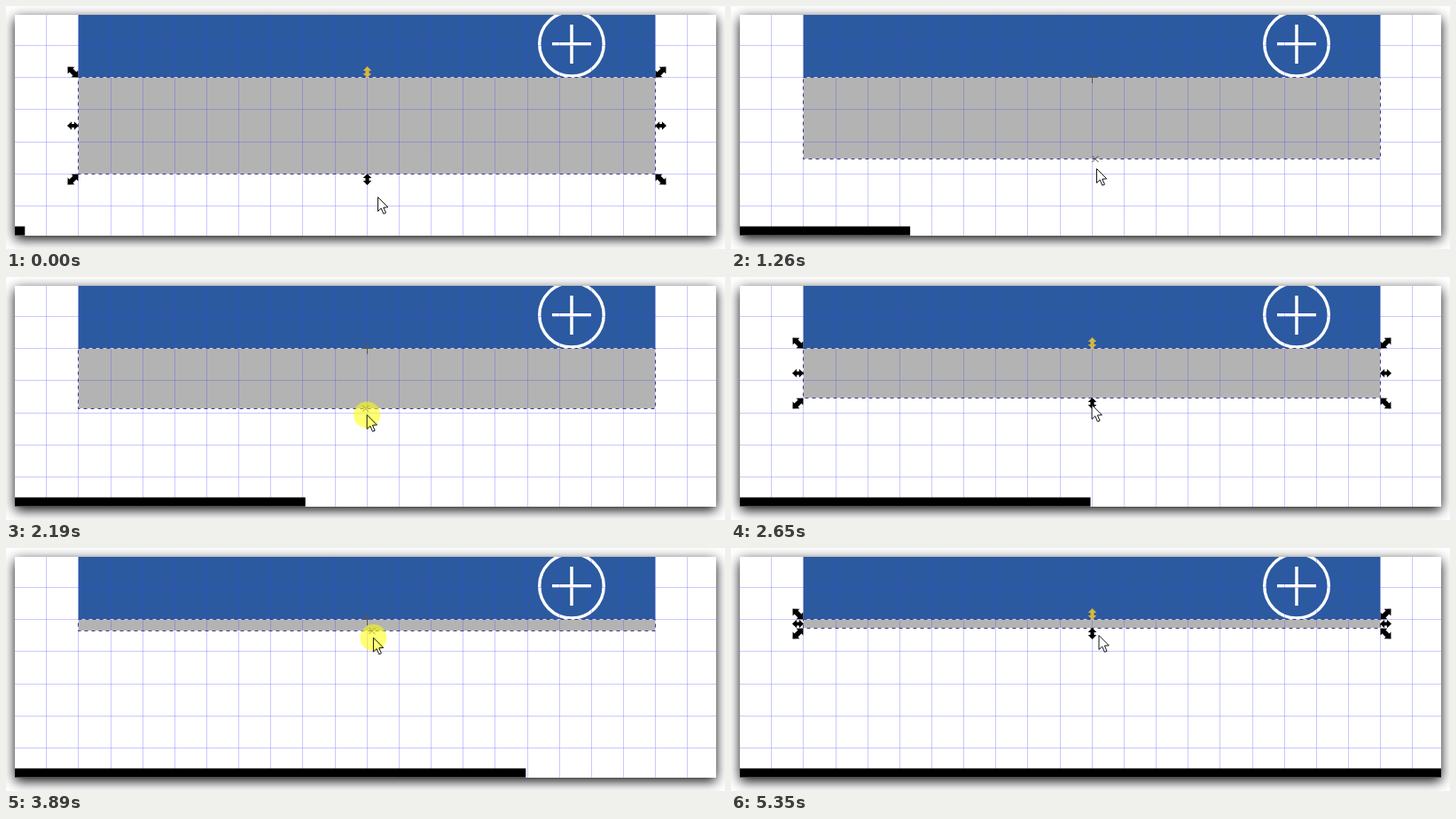
Animation, 811 px wide and 274 px high, one loop 5430 ms. Source, as an HTML page with a canvas:

```html
<!DOCTYPE html>
<html lang="en">
<head>
<meta charset="utf-8">
<title>Resizing a rectangle</title>
<style>
  html, body { margin: 0; width: 100%; height: 100%; overflow: hidden; background: #fff; }
  canvas { display: block; }
</style>
</head>
<body>
<canvas id="stage" width="811" height="274"></canvas>
<script>
const ctx = document.getElementById('stage').getContext('2d');
const LOOP = 5430, STEPS = 70;
const LEFT = 81, RIGHT = 732, TOP = 80, MIDDLE = 407;
const SETTLE = 30; // ms from release until the handles return

// Each stop is eased into; "held" marks a drag that ends there.
const stops = [
  { at: 0, x: 419.5, y: 215.5, bottom: 189 },
  { at: 700, x: 409, y: 200, bottom: 189 },
  { at: 1240, x: 412.5, y: 183.5, bottom: 172, held: true },
  { at: 1870, x: 406.5, y: 174.5, bottom: 172 },
  { at: 2600, x: 407.5, y: 145.5, bottom: 136, held: true },
  { at: 2940, x: 405.5, y: 139.5, bottom: 136 },
  { at: 4190, x: 415, y: 98.5, bottom: 90, held: true },
];

const easeOut = p => 1 - (1 - p) ** 2;

function poseAt(time) {
  const resizing = stops.some((stop, i) =>
    stop.held && time >= stops[i - 1].at && time < stop.at + SETTLE);
  const next = stops.findIndex(stop => stop.at > time);
  if (next < 0) return { ...stops[stops.length - 1], held: false, resizing };
  const a = stops[next - 1], b = stops[next];
  const p = easeOut((time - a.at) / (b.at - a.at));
  const mix = key => a[key] + (b[key] - a[key]) * p;
  return { x: mix('x'), y: mix('y'), bottom: Math.round(mix('bottom')), held: b.held, resizing };
}

function polygon(points) {
  ctx.beginPath();
  points.forEach(([x, y]) => ctx.lineTo(x, y));
  ctx.closePath();
}

function line(color, width, x1, y1, x2, y2) {
  ctx.strokeStyle = color;
  ctx.lineWidth = width;
  ctx.beginPath();
  ctx.moveTo(x1, y1);
  ctx.lineTo(x2, y2);
  ctx.stroke();
}

function disc(x, y, r) {
  ctx.beginPath();
  ctx.arc(x, y, r, 0, 2 * Math.PI);
}

function box(color, x, y, w, h) {
  ctx.fillStyle = color;
  ctx.fillRect(x, y, w, h);
}

function drawPanel() {
  ctx.save();
  ctx.shadowColor = 'rgba(0,0,0,.95)';
  ctx.shadowBlur = 13;
  ctx.shadowOffsetY = 4;
  box('#fff', 10, 10, 791, 249);
  ctx.restore();
}

function drawPlusButton() {
  ctx.strokeStyle = '#fff';
  ctx.lineWidth = 3.5;
  disc(638, 42.8, 36.3);
  ctx.stroke();
  line('#fff', 3.5, 616, 42.8, 660, 42.8);
  line('#fff', 3.5, 638, 21, 638, 65);
}

function drawGrid() {
  const color = 'rgba(63,63,255,.28)', pitch = 36.15;
  for (let k = 1; k < 22; k++) {
    const x = Math.round(9.15 + pitch * k) + .5;
    line(color, 1, x, 10, x, 259);
  }
  for (let k = 1; k < 7; k++) {
    const y = Math.round(8 + pitch * k) + .5;
    line(color, 1, 10, y, 801, y);
  }
}

function drawSelection(bottom) {
  const outline = [LEFT + .5, TOP + .5, RIGHT - LEFT, bottom - TOP];
  ctx.lineWidth = 1;
  ctx.strokeStyle = 'rgba(255,255,255,.55)';
  ctx.strokeRect(...outline);
  ctx.setLineDash([4, 4]);
  ctx.strokeStyle = '#3a3a8c';
  ctx.strokeRect(...outline);
  ctx.setLineDash([]);
}

function drawHandle(x, y, degrees, color = '#000') {
  const diagonal = degrees % 90 !== 0;
  const [tip, base, half, shaft] = diagonal ? [8.5, 2.8, 5.5, 2.8] : [6.5, 1.4, 4.8, 2.1];
  ctx.save();
  ctx.translate(x + .5, y + .5);
  ctx.rotate(degrees * Math.PI / 180);
  polygon([[-tip, 0], [-base, -half], [-base, -shaft], [base, -shaft], [base, -half],
    [tip, 0], [base, half], [base, shaft], [-base, shaft], [-base, half]]);
  ctx.fillStyle = color;
  ctx.fill();
  ctx.restore();
}

function drawHandles(bottom) {
  const l = LEFT - 6, r = RIGHT + 6, t = TOP - 6, b = bottom + 6, mid = (TOP + bottom) / 2;
  drawHandle(l, t, 45);
  drawHandle(r, t, -45);
  drawHandle(l, b, -45);
  drawHandle(r, b, 45);
  drawHandle(l, mid, 0);
  drawHandle(r, mid, 0);
  drawHandle(MIDDLE, b, 90);
  drawHandle(MIDDLE, t, 90, '#d8b640');
}

function drawDragMarks(x, bottom) {
  const y = bottom + .5, d = 3.5;
  line('#5c5650', 1, 401, TOP + .5, 414, TOP + .5);
  line('#5c5650', 1, MIDDLE + .5, TOP - 6, MIDDLE + .5, TOP + 7);
  line('#444', 1, x - d, y - d, x + d, y + d);
  line('#444', 1, x - d, y + d, x + d, y - d);
}

function drawPointer(x, y, held) {
  const arrow = () => polygon([[0, 0], [0, 16], [3.7, 12.6], [6.4, 18.8], [9, 17.7],
    [6.3, 11.7], [11.3, 11.4]].map(([dx, dy]) => [x + dx, y + dy]));
  arrow();
  ctx.fillStyle = '#fff';
  ctx.fill();
  if (held) {
    disc(x, y, 15);
    ctx.fillStyle = 'rgba(255,255,0,.55)';
    ctx.fill();
  }
  arrow();
  ctx.strokeStyle = '#111';
  ctx.lineWidth = 1;
  ctx.stroke();
}

function draw(time) {
  const step = Math.min(STEPS - 1, Math.floor(time / LOOP * STEPS + .05));
  const { x, y, bottom, held, resizing } = poseAt(step * LOOP / STEPS);

  box('#fff', 0, 0, 811, 274);
  drawPanel();
  ctx.save();
  ctx.beginPath();
  ctx.rect(10, 10, 791, 249);
  ctx.clip();
  box('#2c5aa0', LEFT + .7, 10, RIGHT - LEFT - .4, TOP - 10);
  box('#b3b3b3', LEFT + .7, TOP, RIGHT - LEFT - .4, bottom - TOP);
  drawPlusButton();
  drawGrid();
  drawSelection(bottom);
  if (resizing) drawDragMarks(x - 1.5, bottom);
  else drawHandles(bottom);
  drawPointer(x, y, held);
  box('#000', 10, 248.5, 791 * (step + 1) / STEPS, 10.2);
  ctx.restore();
}

const start = performance.now();
function tick() {
  draw((performance.now() - start) % LOOP);
  requestAnimationFrame(tick);
}
tick();
</script>
</body>
</html>
```
